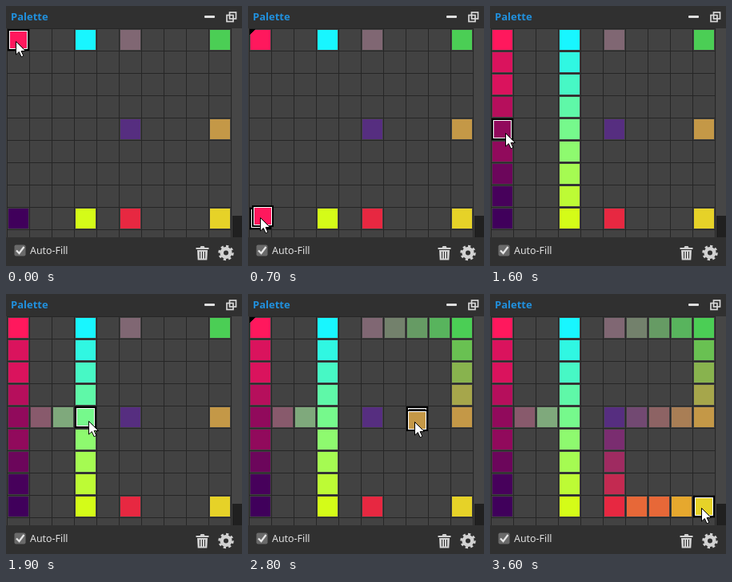
An HTML page that plays this animation: 295 by 326 pixels, repeating every 5.6 s.

```html
<!DOCTYPE html>
<html lang="en">
<head>
<meta charset="utf-8">
<title>Palette</title>
<style>
  html, body { margin: 0; width: 100%; height: 100%; overflow: hidden; background: #303030; }
  svg { display: block; width: 295px; height: 326px; }
  text { font-family: "Noto Sans", "Open Sans", sans-serif; }
</style>
</head>
<body>
<svg viewBox="0 0 295 326" width="295" height="326">
  <rect width="295" height="326" fill="#303030"/>
  <text x="6" y="18" font-size="13" font-weight="700" fill="#2190dd">Palette</text>
  <rect x="248" y="12" width="13" height="3" rx="1" fill="#e0e0e0"/>
  <g fill="none" stroke="#d8d8d8" stroke-width="1.7">
    <rect x="279.500" y="8" width="8" height="8"/>
    <rect x="276" y="11.500" width="8" height="8"/>
  </g>

  <rect y="28" width="283" height="262" fill="#424242"/>
  <rect x="283" y="28" width="12" height="235" fill="#464646"/>
  <rect x="283" y="263" width="12" height="27" fill="#202020"/>
  <path id="lines" fill="none" stroke="#262626"/>
  <g id="cells" shape-rendering="crispEdges"></g>
  <g id="marks" shape-rendering="crispEdges"></g>

  <rect x="10.500" y="299.500" width="14" height="14" rx="2" fill="#6a6a6a"/>
  <path d="M13 306.500L16.500 310L22.500 302" fill="none" stroke="#e6e6e6" stroke-width="2.200"/>
  <text x="30" y="311" font-size="12.400" fill="#e0e0e0">Auto-Fill</text>
  <g fill="#d2d2d2">
    <path d="M237.500 303H242.500L243.500 301H247.500L248.500 303H253.500V305H237.500Z"/>
    <path d="M239 306H252L251.300 318.500H239.700Z"/>
    <path d="M242.500 308V316.500M245.500 308V316.500M248.500 308V316.500" stroke="#303030"/>
  </g>
  <g fill="none" stroke="#d2d2d2">
    <circle cx="275" cy="309.500" r="5.300" stroke-width="4.600"/>
    <circle cx="275" cy="309.500" r="8.300" stroke-width="2.800" pathLength="16" stroke-dasharray="1"/>
  </g>
  <path id="cursor" d="M0 0V16.500L3.800 13L6.600 19.300L9.400 18L6.600 12H12Z" fill="#fff" stroke="#000"/>
</svg>
<script>
const LOOP = 5600, STEP = 100, PAUSE = 200;
const PITCH = 28, COLS = 10, ROWS = 9, EMPTY = '#424242', SWAY = 4;
const $ = id => document.getElementById(id);

const swatches = {
  '0,0': '#ff185d', '3,0': '#18f6ff', '5,0': '#806773', '9,0': '#4bce55',
  '5,4': '#562e80', '9,4': '#c49847',
  '0,8': '#40005b', '3,8': '#d4fc18', '5,8': '#e72841', '9,8': '#e6d228'
};

// hold: rest on the first cell; grab: where the pointer holds it;
// levels: coarseness of the blend filled in on drop
const drags = [
  { from: [0, 0], to: [0, 8], hold: 500, move: 300, ease: 3, levels: 5.2 },
  { from: [3, 8], to: [3, 0], hold: 100, move: 300, grab: [18, 14] },
  { from: [0, 4], to: [3, 4], hold: 200, move: 100, grab: [18, 19] },
  { from: [5, 0], to: [9, 0], hold: 100, move: 100 },
  { from: [9, 0], to: [9, 4], hold: 0, move: 100 },
  { from: [9, 4], to: [5, 4], hold: 0, move: 100 },
  { from: [5, 4], to: [5, 8], hold: 0, move: 100 },
  { from: [5, 8], to: [9, 8], hold: 0, move: 200, levels: 2.65 }
];

// Schedule the drags one after another
let clock = 0;
for (const d of drags) {
  d.press = clock;
  d.lift = d.press + d.hold;
  d.drop = d.lift + d.move;
  clock = d.drop + PAUSE;
}

const corner = ([c, r]) => [2 + PITCH * c, 29 + PITCH * r];
const cellAt = ([x, y]) => [Math.floor((x - 1) / PITCH), Math.floor((y - 28) / PITCH)];
const lerp = (a, b, t) => a + (b - a) * t;
const rect = (x, y, w, fill) => `<rect x="${x}" y="${y}" width="${w}" height="${w}" fill="${fill}"/>`;
const framed = ([x, y], fill) =>
  rect(x, y, 27, '#000') + rect(x + 2, y + 2, 23, '#fff') + rect(x + 3, y + 3, 21, fill);

function blend(a, b, t) {
  const part = (hex, i) => parseInt(hex.slice(i, i + 2), 16);
  return '#' + [1, 3, 5].map(i =>
    Math.round(lerp(part(a, i), part(b, i), t)).toString(16).padStart(2, '0')).join('');
}

function coloursAt(time) {
  const cells = { ...swatches };
  for (const { drop, from, to, levels } of drags) {
    if (time < drop) break;
    const n = Math.max(...from.map((v, i) => Math.abs(to[i] - v)));
    for (let i = 1; i < n; i++) {
      const t = i / n, mix = levels ? Math.round(t * levels) / levels : t;
      cells[from.map((v, k) => lerp(v, to[k], t))] = blend(cells[from], cells[to], mix);
    }
  }
  return cells;
}

// Corner of the held swatch, bowing slightly to one side of its path
function heldAt({ from, to, lift, move, drop, ease = 1 }, time) {
  if (time < lift) return corner(from);
  if (time >= drop) return corner(to);
  const p = (time - lift + STEP) / (move + STEP);
  const t = 1 - (1 - p) ** ease, bow = SWAY * Math.sin(Math.PI * p);
  const a = corner(from), b = corner(to);
  const dx = Math.sign(b[0] - a[0]), dy = Math.sign(b[1] - a[1]);
  return [Math.round(lerp(a[0], b[0], t) + bow * dy), Math.round(lerp(a[1], b[1], t) - bow * dx)];
}

let shown = -1;
function render(now) {
  const time = Math.floor(now / STEP) * STEP;
  if (time === shown) return;
  shown = time;

  const drag = drags.findLast(d => d.press <= time);
  const { grab = [11, 16] } = drag;
  const held = heldAt(drag, time), tip = held.map((v, i) => v + grab[i]);
  const cells = coloursAt(time), under = cellAt(tip);

  $('cells').innerHTML = Object.entries(cells).map(([key, fill]) => {
    const [x, y] = corner(key.split(',').map(Number));
    return rect(x + 1, y + 1, 25, fill);
  }).join('');

  let marks = framed(corner(under), cells[under] || EMPTY);
  if (time >= drag.lift && time < drag.drop) {
    marks = '<path d="M2 29H9L2 36Z"/>' + marks + framed(held, cells[drag.from]);
  }
  $('marks').innerHTML = marks;
  $('cursor').setAttribute('transform', `translate(${tip[0] - .5} ${tip[1] - .5})`);
}

let grid = '';
for (let i = 0; i <= COLS; i++) grid += `M${1.5 + PITCH * i} 28V290`;
for (let i = 0; i <= ROWS; i++) grid += `M1 ${28.5 + PITCH * i}H282`;
$('lines').setAttribute('d', grid);

const start = performance.now();
function tick(now) {
  render(Math.max(0, now - start) % LOOP);
  requestAnimationFrame(tick);
}
render(0);
requestAnimationFrame(tick);
</script>
</body>
</html>
```
